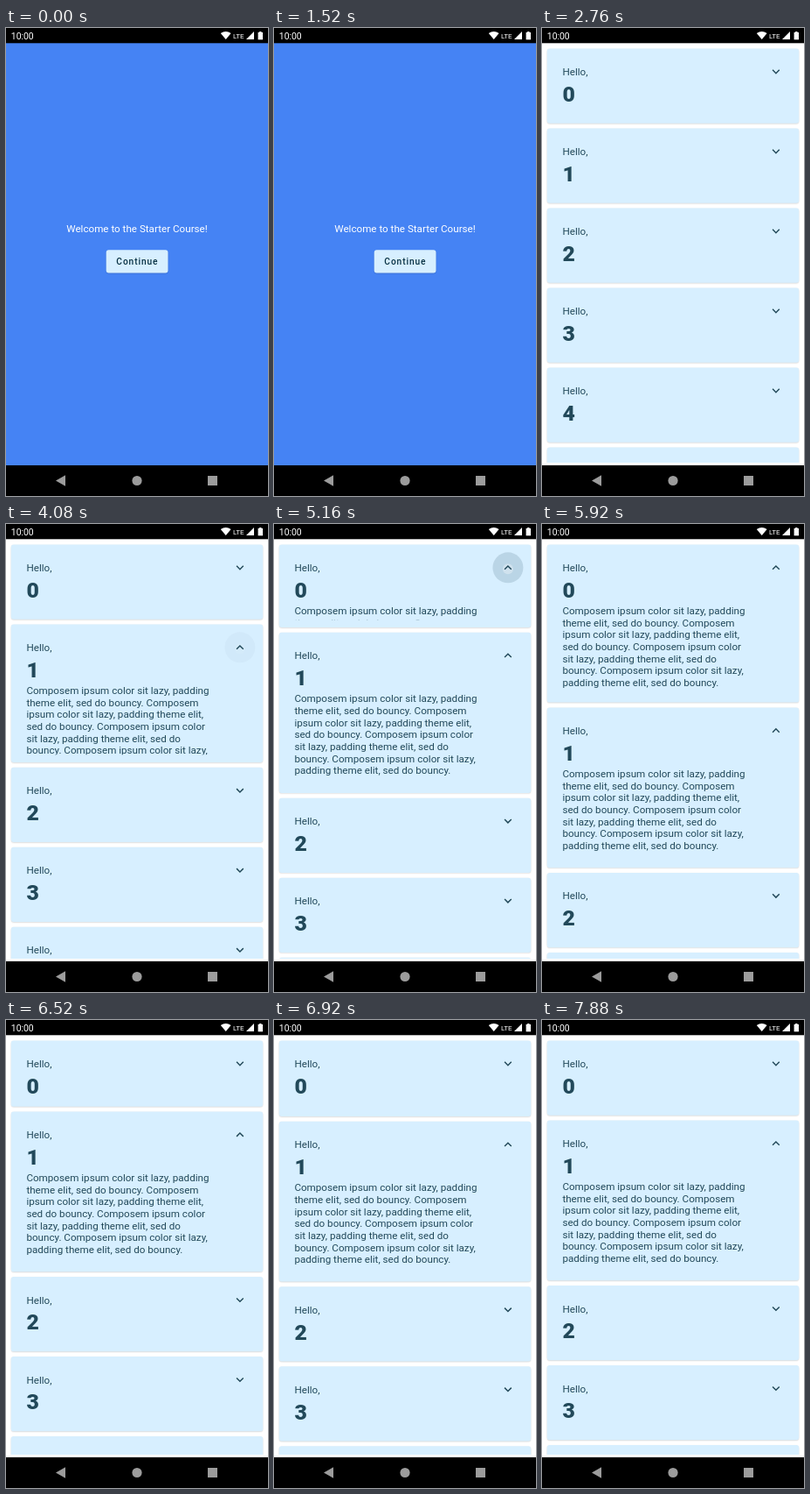
These frames come from a looping animation (300 by 534 pixels, 8.56 s). An HTML page with a canvas:

```html
<!DOCTYPE html>
<html lang="en">
<head>
<meta charset="utf-8">
<title>Expanding list</title>
<style>
  html, body { margin: 0; width: 100%; height: 100%; overflow: hidden; background: #000; }
  canvas { display: block; width: 300px; height: 534px; }
</style>
</head>
<body>
<canvas id="stage"></canvas>
<script>
const W = 300, H = 534, LOOP = 8560;
const DP = W / 411.43;
const LIST_AT = 2400;
const CARD = { x: 5.8, w: 288.4, top: 23.5, h: 85.2, pitch: 91, grow: 97.5 };
const INK = '#22495a', NAVY = '#073042', PALE = '#d7efff', BLUE = '#4583f4';
const BODY = 11.65, LEADING = 13.67;
const LINES = [
  'Composem ipsum color sit lazy, padding',
  'theme elit, sed do bouncy. Composem',
  'ipsum color sit lazy, padding theme elit,',
  'sed do bouncy. Composem ipsum color',
  'sit lazy, padding theme elit, sed do',
  'bouncy. Composem ipsum color sit lazy,',
  'padding theme elit, sed do bouncy.'
];
// Each tap toggles its card on release.
const TAPS = [
  { card: 1, down: 3680, up: 3881 },
  { card: 0, down: 4720, up: 5107 },
  { card: 0, down: 5960, up: 6196 }
];

const canvas = document.getElementById('stage');
const ctx = canvas.getContext('2d');
const ratio = window.devicePixelRatio || 1;
canvas.width = W * ratio;
canvas.height = H * ratio;

const clamp = v => Math.max(0, Math.min(1, v));
const easeOut = v => 1 - (1 - v) ** 2;

// Step response of a spring with damping ratio 0.5.
function spring(ms) {
  if (ms <= 0) return 0;
  const x = 8.8 * ms / 1000, a = Math.sqrt(0.75) * x;
  return 1 - Math.exp(-x / 2) * (Math.cos(a) + Math.sin(a) / Math.sqrt(3));
}

function text(str, x, y, size, color, weight = 400, align = 'left', spacing = 0) {
  ctx.font = `${weight} ${size}px Roboto, sans-serif`;
  ctx.letterSpacing = spacing + 'px';
  ctx.textAlign = align;
  ctx.fillStyle = color;
  ctx.fillText(str, x, y);
}

function rect(x, y, w, h, color) {
  ctx.fillStyle = color;
  ctx.fillRect(x, y, w, h);
}

function poly(points, color) {
  ctx.beginPath();
  points.forEach(([x, y]) => ctx.lineTo(x, y));
  ctx.closePath();
  ctx.fillStyle = color;
  ctx.fill();
}

function disc(x, y, r, color) {
  ctx.beginPath();
  ctx.arc(x, y, r, 0, 7);
  ctx.fillStyle = color;
  ctx.fill();
}

function panel(x, y, w, h, r) {
  ctx.save();
  ctx.shadowColor = 'rgba(0,0,0,.16)';
  ctx.shadowBlur = 1.5 * ratio;
  ctx.shadowOffsetY = 0.7 * ratio;
  ctx.beginPath();
  ctx.roundRect(x, y, w, h, r);
  ctx.fillStyle = PALE;
  ctx.fill();
  ctx.restore();
}

function ripple(x, y, r, t, down, up) {
  if (t < down || t > up + 240) return 0;
  const alpha = clamp((t - down) / 120) * (1 - clamp((t - up) / 240));
  const grown = 0.3 + 0.7 * easeOut(clamp((t - down) / 320));
  disc(x, y, r * grown, `rgba(7,48,66,${0.17 * alpha})`);
  return alpha;
}

function chevron(x, y, up) {
  const flip = up ? -1 : 1;
  const shape = [[4.59, -3.41], [0, 1.17], [-4.59, -3.41], [-6, -2], [0, 4], [6, -2]];
  poly(shape.map(([a, b]) => [x + a * DP, y + (b * flip) * DP]), INK);
}

function welcome(t) {
  rect(0, 17, W, 482, BLUE);
  text('Welcome to the Starter Course!', 150, 232.5, BODY, '#fff', 400, 'center');
  panel(114.7, 253.2, 70.8, 26.3, 2.9);
  ctx.save();
  ctx.beginPath();
  ctx.roundRect(114.7, 253.2, 70.8, 26.3, 2.9);
  ctx.clip();
  ripple(160, 266, 50, t, 1520, LIST_AT);
  ctx.restore();
  text('Continue', 150.4, 270.2, 10.2, NAVY, 500, 'center', 0.9);
}

function cardState(i, t) {
  let open = false, amount = 0;
  for (const tap of TAPS) {
    if (tap.card !== i || t < tap.up) continue;
    open = !open;
    amount += (open ? 1 : -1) * spring(t - tap.up);
  }
  return { open, h: CARD.h + CARD.grow * amount };
}

function card(i, y, state, t) {
  const x = 23.4, iconX = 267.9, iconY = y + 26.3;
  panel(CARD.x, y, CARD.w, state.h, 2.9);
  ctx.save();
  ctx.beginPath();
  ctx.rect(CARD.x, y, CARD.w, state.h - 12 * DP);
  ctx.clip();
  text('Hello,', x, y + 30.5, BODY, INK);
  text(String(i), x, y + 60.3, 24.8, INK, 800);
  if (state.open) {
    LINES.forEach((line, n) => text(line, x, y + 79.5 + n * LEADING, BODY, INK));
  }
  ctx.restore();
  let touch = 0;
  for (const tap of TAPS) {
    if (tap.card === i) touch += ripple(iconX, iconY, 17.5, t, tap.down, tap.up);
  }
  if (touch) disc(iconX, iconY + 1.5, 6, `rgba(255,255,255,${0.4 * touch})`);
  chevron(iconX, iconY, state.open);
}

function list(t) {
  rect(0, 17, W, 482, '#fff');
  ctx.save();
  ctx.beginPath();
  ctx.rect(0, 20.4, W, 475.6);
  ctx.clip();
  let y = CARD.top;
  for (let i = 0; y < 496; i++) {
    const state = cardState(i, t);
    card(i, y, state, t);
    y += state.h + CARD.pitch - CARD.h;
  }
  ctx.restore();
}

function systemBars() {
  rect(0, 0, W, 17.3, '#000');
  text('10:00', 5.8, 12.8, 10.4, '#fff');
  ctx.beginPath();
  ctx.moveTo(251.7, 13);
  ctx.lineTo(245.8, 6);
  ctx.quadraticCurveTo(251.7, 2, 257.6, 6);
  ctx.fillStyle = '#fff';
  ctx.fill();
  text('LTE', 260, 12, 8, '#fff');
  poly([[284, 4], [284, 13], [275, 13]], '#fff');
  rect(288.6, 5, 5.4, 8.3, '#fff');
  rect(290.1, 4, 2.4, 1, '#fff');

  const grey = '#9c9c9c';
  rect(0, 499, W, 35, '#000');
  poly([[57, 516.5], [68, 510.3], [68, 522.7]], grey);
  disc(150, 516.5, 5.6, grey);
  rect(231, 511, 11, 11, grey);
}

function draw(now) {
  const t = now % LOOP;
  ctx.setTransform(ratio, 0, 0, ratio, 0, 0);
  if (t < LIST_AT) welcome(t);
  else list(t);
  systemBars();
}

const start = performance.now();
function tick() {
  draw(performance.now() - start);
  requestAnimationFrame(tick);
}
tick();
</script>
</body>
</html>
```
